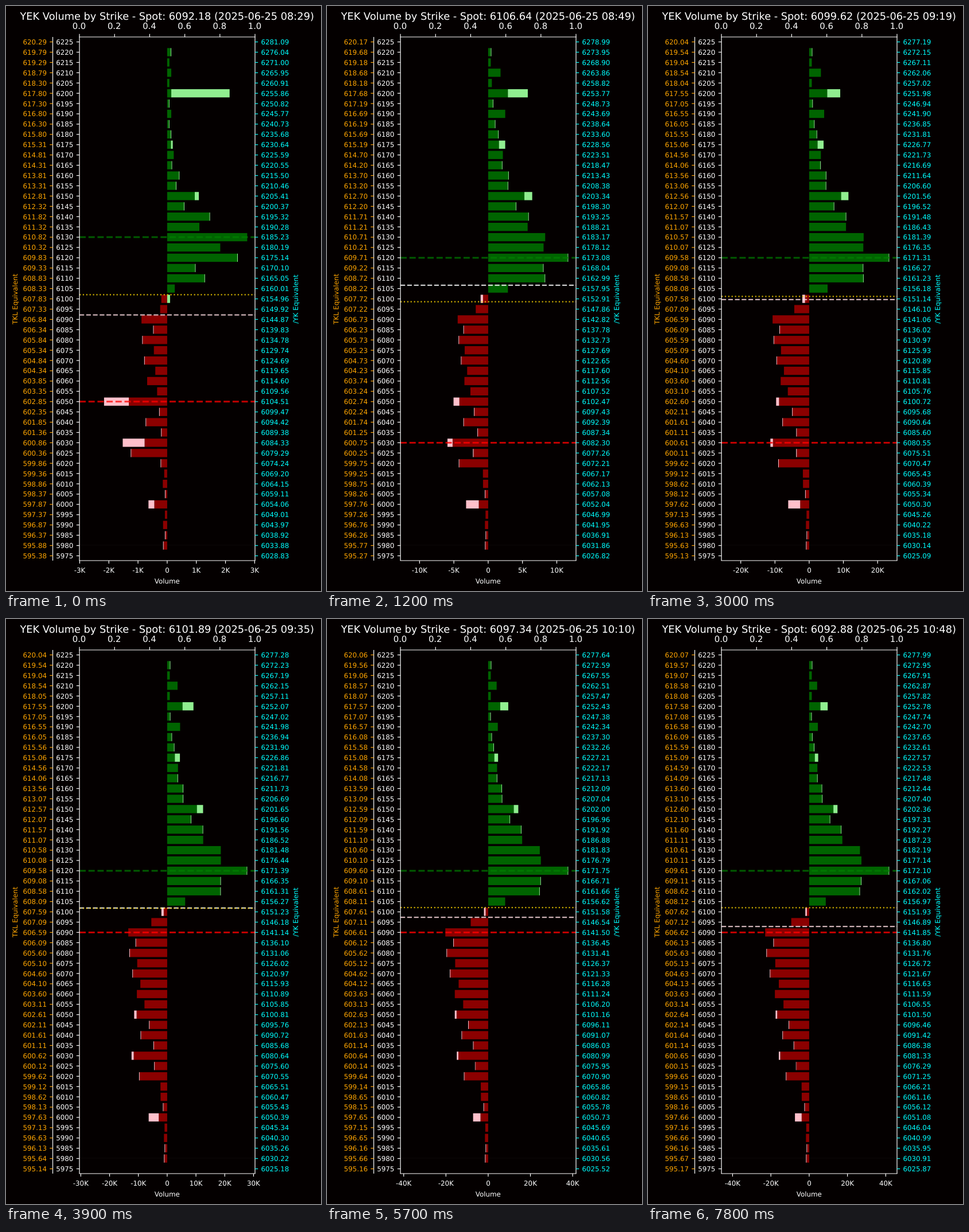
Recreate the animation shown at these times as an HTML page. Size 549x1020 px, loop 8 s.

```html
<!DOCTYPE html>
<html lang="en">
<head>
<meta charset="utf-8">
<title>Volume by Strike</title>
<style>
html, body { margin: 0; width: 100%; height: 100%; overflow: hidden; background: #040000; }
svg { display: block; width: 100%; height: 100%; font: 11.85px "DejaVu Sans", sans-serif; text-rendering: geometricPrecision; }
</style>
</head>
<body>
<svg id="chart" viewBox="0 0 549 1020"></svg>
<script>
const LEFT = 128, RIGHT = 434, TOP = 54, BOTTOM = 967, ZERO = 280.9;
const LOOP = 8000, STEP = 300, REACH = 139.5;
const ORANGE = '#ffa500', CYAN = '#0ff', WHITE = '#fff';
const MIDDLE = 6100;

// Market key points: step, minute of day, spot, flip level, fund ratio, future ratio,
// largest volume in thousands, spread of the call volume
const keys = [
  [0, 509, 6092.18, 6102, .09964466, 1.00901, 2.745, 16],
  [2, 519, 6106.85, 6098.8, .099645775, 1.0089281, 8.08, 29],
  [6, 539, 6106.43, 6098.4, .0996071, 1.008418, 15.25, 30],
  [10, 559, 6099.62, 6101.2, .09960405, 1.0083838, 23.4, 26],
  [16, 590, 6104.16, 6102.2, .0996052, 1.0084114, 32.2, 24],
  [21, 623, 6092.8, 6102, .0996102, 1.0084852, 41.7, 22],
  [26, 648, 6092.88, 6102, .0996097, 1.00851316, 41.8, 22]
];

// Block trades in thousands: [at the open, added later, light part at the open, light part later]
const blocks = {
  6210: [0, 2.5, 0, 0],
  6200: [2, 6, 2, 1.8],
  6190: [0, 2.8, 0, 0],
  6175: [.1, 1.8, .06, 1.7],
  6150: [.3, 3.8, .14, 2],
  6100: [.2, 1.8, -.1, .9],
  6050: [1.6, 1.2, .85, 0],
  6040: [.3, 2.2, 0, 0],
  6030: [1.2, 6.2, .75, 0],
  6025: [1.1, 0, 0, .2],
  6020: [0, 6.3, 0, 0],
  6000: [.5, 4.5, .2, 3.3]
};

const strikes = Array.from({ length: 49 }, (_, n) => 6220 - 5 * n);
const lerp = (a, b, p) => a + (b - a) * p;
const clamp = v => Math.max(0, Math.min(1, v));
const random = seed => Math.abs(Math.sin(seed * 12.9898) * 43758.5453) % 1;
const yOf = strike => 62.6 + (6225 - strike) * 3.584;
const halfEven = v => v % 1 === .5 ? 2 * Math.round(v / 2) : Math.round(v);
const pad = n => String(n).padStart(2, '0');

const line = (x1, y1, x2, y2, color = WHITE, width = 1.2, more = '') =>
  `<path d="M${x1} ${y1}L${x2} ${y2}" stroke="${color}" stroke-width="${width}" ${more}/>`;
const level = (strike, color, width, dash, alpha) =>
  line(LEFT, yOf(strike), RIGHT, yOf(strike), color, width, `stroke-dasharray="${dash}" opacity="${alpha}"`);
const text = (x, y, s, anchor = 'middle', color = WHITE, more = '') =>
  `<text x="${x}" y="${y}" text-anchor="${anchor}" fill="${color}" ${more}>${s}</text>`;
const sideText = (x, s, color) =>
  text(0, 0, s, 'middle', color, `transform="translate(${x} 511) rotate(-90)"`);
const bar = (from, to, y, color) =>
  `<rect x="${ZERO + Math.min(from, to)}" y="${y - 7.15}" width="${Math.abs(to - from)}" height="14.3" fill="${color}"/>`;

function marketAt(step) {
  const i = Math.max(1, keys.findIndex(k => k[0] >= step));
  const a = keys[i - 1], b = keys[i], p = (step - a[0]) / (b[0] - a[0]);
  const [, minute, spot, flip, fund, future, max, spread] = a.map((v, n) => lerp(v, b[n], p));
  return { minute: Math.round(minute), spot, flip, fund, future, max, spread };
}

// Calls decay exponentially around their peak, puts follow a bell curve;
// odd fives trade less and both sides fade out towards the middle strike.
function shareOf(strike, step, spread) {
  const peak = 6120 + 6 * clamp(1 - step / 2);
  const share = strike > MIDDLE
    ? Math.exp(-Math.abs(strike - peak) / spread)
    : (.25 + .3 * Math.sqrt(clamp(step / 21))) * Math.exp(-(((6090 - strike) / 60) ** 2));
  const weight = strike % 10 ? .55 + .27 * clamp(step / 2) : 1;
  return Math.max(.04, share) * weight * clamp(Math.abs(strike - MIDDLE) / 10);
}

function volumesAt(step, { max, spread }) {
  const shares = strikes.map(s => shareOf(s, step, spread));
  const unit = max / Math.max(...shares), later = clamp((step - 2) / 4);
  return strikes.map((strike, n) => {
    const [open, added, light, lightAdded] = blocks[strike] || [0, 0, 0, 0];
    const sliver = random(strike) < .5 ? max / REACH : 0;
    return {
      strike,
      size: (shares[n] * unit + open + added * later) * (strike > MIDDLE ? 1 : -1),
      tip: light + lightAdded * later || sliver
    };
  });
}

function drawBar({ strike, size, tip }, scale) {
  const y = yOf(strike), end = size * scale, sign = Math.sign(size);
  const [dark, light, other] = sign > 0 ? ['#006400', '#90ee90', '#ffc0cb'] : ['#8b0000', '#ffc0cb', '#90ee90'];
  const inner = end - sign * Math.min(Math.max(0, tip * scale), Math.abs(end));
  return bar(0, inner, y, dark) + bar(inner, end, y, light) +
    (tip < 0 ? bar(0, sign * tip * scale, y, other) : '');
}

function drawLevels(rows, { spot, flip }) {
  const top = rows.reduce((a, b) => b.size > a.size ? b : a);
  const low = rows.reduce((a, b) => b.size < a.size ? b : a);
  return level(spot, spot < flip ? '#ffdde2' : WHITE, 2.2, '8.2 3.55', .8) +
    level(flip, '#ffd700', 2.2, '2.2 3.67', .8) +
    level(top.strike, '#008000', 2.96, '10.96 4.74', .7) +
    level(low.strike, '#f00', 2.96, '10.96 4.74', .75);
}

function drawAxes({ fund, future }, scale) {
  let out = [LEFT, RIGHT, 81.5].map(x => line(x, TOP, x, BOTTOM)).join('') +
    [TOP, BOTTOM].map(y => line(LEFT - .6, y, RIGHT + .6, y)).join('');
  for (let strike = 6225; strike >= 5975; strike -= 5) {
    const y = yOf(strike), base = y + 4.4;
    out += line(76.3, y, 81.5, y, ORANGE) + text(71, base, (strike * fund).toFixed(2), 'end', ORANGE) +
      line(LEFT - 5.2, y, LEFT, y) + text(117.4, base, strike, 'end') +
      line(RIGHT, y, RIGHT + 5.2, y, CYAN) + text(444.4, base, (strike * future).toFixed(2), 'start', CYAN);
  }
  for (let n = 0; n <= 5; n++) {
    const x = lerp(LEFT, RIGHT, n / 5);
    out += line(x, TOP - 5.2, x, TOP) + text(x - .5, 40, (n / 5).toFixed(1), 'middle', WHITE, 'font-size="14.81"');
  }
  const limit = 153.4 / scale;
  const gap = [1, 2, 2.5, 5, 10, 20].find(g => 2 * limit / g <= 8.2);
  const count = Math.floor(limit / gap);
  for (let n = -count; n <= count; n++) {
    const x = ZERO + n * gap * scale;
    const label = n ? (n < 0 ? '-' : '') + halfEven(Math.abs(n * gap)) + 'K' : '0';
    out += line(x, BOTTOM, x, BOTTOM + 5.2) + text(x, 988.3, label);
  }
  return out;
}

function draw(step) {
  const market = marketAt(step), rows = volumesAt(step, market), scale = REACH / market.max;
  const clock = pad(Math.floor(market.minute / 60)) + ':' + pad(market.minute % 60);
  chart.innerHTML = line(LEFT, 940, RIGHT, 940, '#0d0909', 1) +
    rows.map(row => drawBar(row, scale)).join('') + drawLevels(rows, market) + drawAxes(market, scale) +
    text(280.7, 24, `YEK Volume by Strike - Spot: ${market.spot.toFixed(2)} (2025-06-25 ${clock})`, 'middle', WHITE, 'font-size="17.77"') +
    text(280.9, 1007, 'Volume') +
    sideText(19.5, 'TKL Equivalent', ORANGE) + sideText(509, '/YK Equivalent', CYAN);
}

const chart = document.getElementById('chart');
const start = performance.now();
let shown = -1;
function tick() {
  const step = Math.floor((performance.now() - start) % LOOP / STEP);
  if (step !== shown) draw(shown = step);
  requestAnimationFrame(tick);
}
tick();
</script>
</body>
</html>
```
